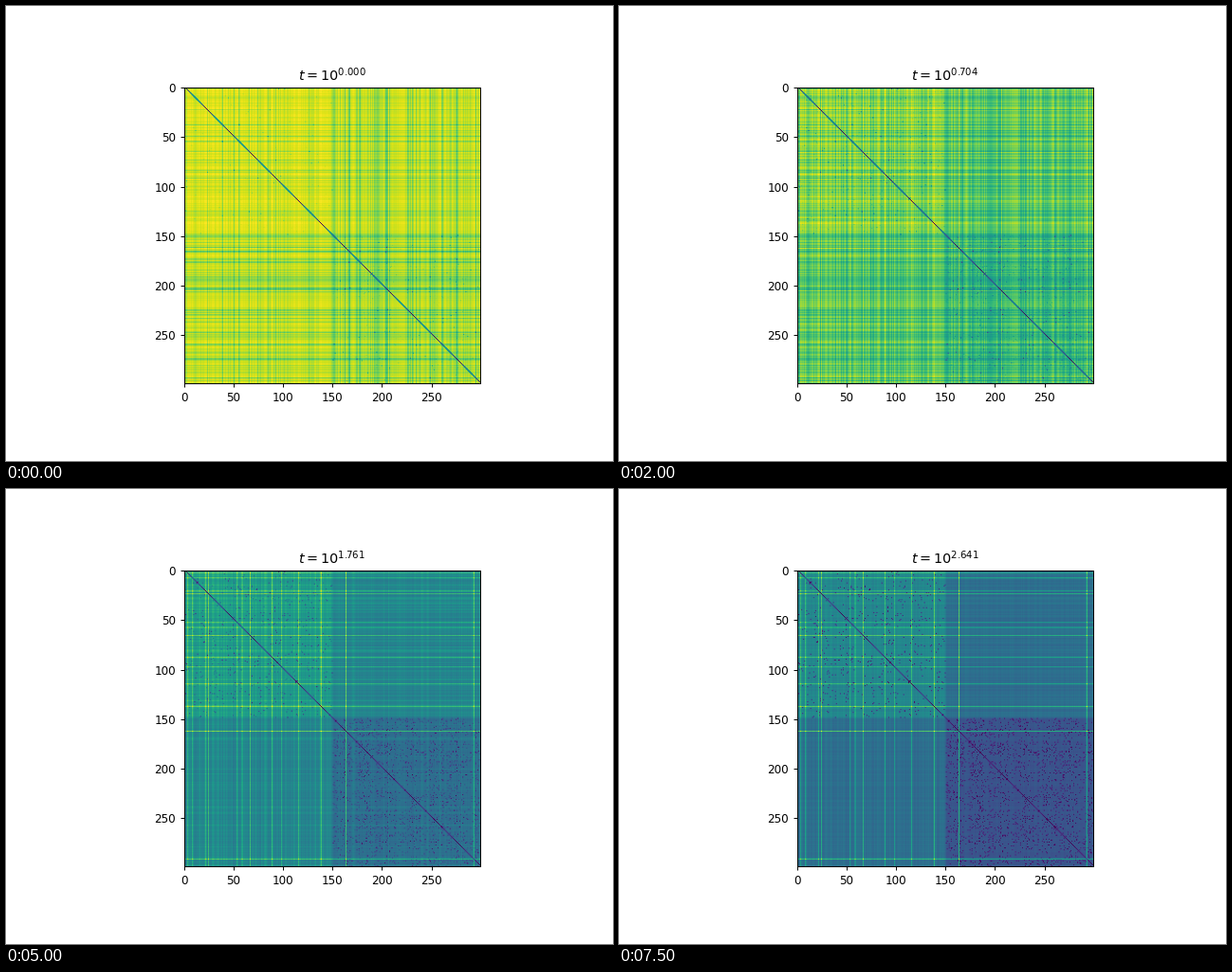
Animation of 640x480 px, one loop 8 s. Source, as a matplotlib script:

```python
import numpy as np
import matplotlib.pyplot as plt
from matplotlib.animation import FuncAnimation

DPI = 86.4
WIDTH, HEIGHT = 640, 480
FRAMES, INTERVAL = 16, 500
GROWTH = 1.5
N, HALF = 300, 150
LONELY = [8, 66, 138, 163, 292]

rng = np.random.default_rng(11)


def build_graph():
    """Two communities with heavy-tailed ties, the second one denser."""
    group = np.arange(N) // HALF
    density = np.where(group == 0, 0.03, 0.085)
    activity = rng.uniform(0.4, 1.6, N)
    activity[LONELY] = 0
    prob = density[:, None] * np.outer(activity, activity)
    prob *= group[:, None] == group[None, :]
    linked = rng.random((N, N)) < prob
    ties = np.triu(linked * 0.008 / (1 - rng.random((N, N))), 1)
    ties += ties.T

    degree = np.where(group == 0, 0.013, 0.024) * rng.uniform(1, 1.3, N)
    degree[LONELY] = 0.013
    return ties, degree


ties, degree = build_graph()
strongest = ties.max(axis=1)


def distance(t):
    # Each node keeps its own share; a strong tie merges its two ends.
    pull = t * strongest
    share = (1 + pull) / (1 + 2 * pull) / (1 + t * degree)
    dist = np.add.outer(share, share) / (1 + t * ties)
    np.fill_diagonal(dist, 0)
    return dist


fig = plt.figure(figsize=(WIDTH / DPI, HEIGHT / DPI), dpi=DPI, facecolor="white")
left, top, side = 187.5, 85.8, 312.6
ax = fig.add_axes([left / WIDTH, 1 - (top + side) / HEIGHT, side / WIDTH, side / HEIGHT])
image = ax.imshow(distance(1), cmap="viridis", vmin=0)
ax.set_xticks(range(0, N, 50))
ax.set_yticks(range(0, N, 50))
title = ax.set_title("")


def update(frame):
    t = GROWTH ** frame
    dist = distance(t)
    image.set_data(dist)
    image.set_clim(0, dist.max())
    title.set_text(f"$t = 10^{{{np.log10(t):.3f}}}$")
    return image, title


anim = FuncAnimation(fig, update, frames=FRAMES, interval=INTERVAL,
                     repeat=True, repeat_delay=0, blit=False)
plt.show()
```
